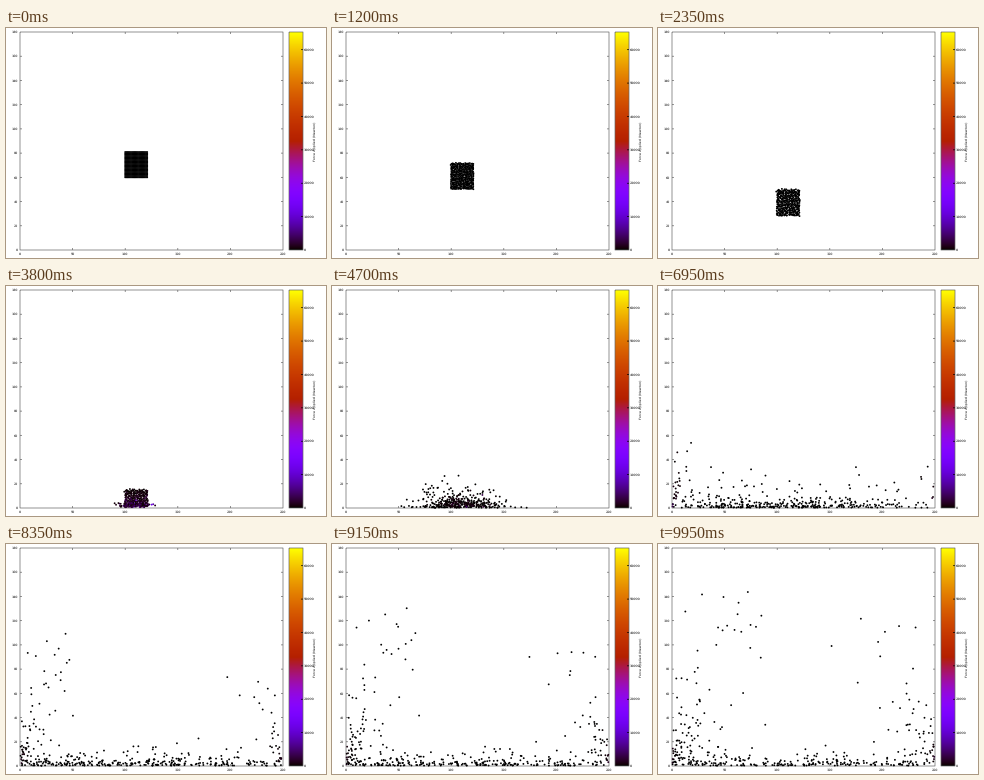
Animation of 320 by 230 pixels, one loop 10 s. Source, as a matplotlib script:

```python
import numpy as np
import matplotlib.pyplot as plt
from matplotlib.animation import FuncAnimation

W, H, DPI = 320, 230, 80
PX = 72 / DPI                       # points per pixel
FRAMES, INTERVAL, SUBSTEPS = 200, 50, 4
LEFT, RIGHT, TOP, BOTTOM = 14, 277, 4, 222
X_MAX, Y_MAX, FORCE_MAX = 250, 180, 65300
BAR_LEFT, BAR_RIGHT = 283, 297
GRAVITY, FALL_ACCEL, FALL_SPEED = 12.0, 14.0, 26.0

plt.rcParams["font.family"] = "DejaVu Sans"
plt.rcParams["text.hinting"] = "no_hinting"


def to_px(x, y):
    return (LEFT + x * (RIGHT - LEFT) / X_MAX,
            BOTTOM - y * (BOTTOM - TOP) / Y_MAX)


def palette(level):
    """Black, violet, red, orange, yellow ramp for levels in 0..1."""
    v = np.clip(level, 0, 1)
    blue = np.clip(np.sin(2 * np.pi * v), 0, 1)
    return np.stack([np.sqrt(v), v ** 3, blue], axis=-1)


def fall_distance(t):
    return (FALL_SPEED ** 2 / FALL_ACCEL
            * np.log(np.cosh(FALL_ACCEL * t / FALL_SPEED)))


def simulate():
    """Drop a block of grains; return positions and forces for every frame."""
    rng = np.random.default_rng(11)
    gx, gy = np.meshgrid(100 + 1.1 * np.arange(20), 60 + 1.1 * np.arange(20))
    x0, y0 = gx.ravel(), gy.ravel()
    n = x0.size
    jitter = np.clip(rng.normal(0, 0.45, (2, n)), -0.9, 0.9)
    floor = rng.uniform(0.2, 2.5, n)
    spread = rng.normal(-2, 25, n) + 0.6 * (x0 - 110.5)
    spread = np.clip(spread, -42, 50) * rng.uniform(0.88, 1, n)
    throw = np.minimum(3 + rng.exponential(5.5, n), 28)
    peak = rng.exponential(2600, n)

    times = np.linspace(0, 5, 2000)
    land = np.interp(y0 - floor, fall_distance(times), times)

    x, y = x0.copy(), y0.copy()
    vx, vy = np.zeros(n), np.zeros(n)
    wall_force = np.zeros(n)
    free = np.zeros(n, bool)
    dt = INTERVAL / 1000 / SUBSTEPS
    path = []
    for step in range(FRAMES * SUBSTEPS):
        t = step * dt
        if step % SUBSTEPS == 0:
            squeeze = peak * np.exp(-((t - land) / 0.32) ** 2)
            path.append((x.copy(), y.copy(), squeeze + wall_force))
        t += dt

        start = ~free & (t >= land)
        vx[start], vy[start] = spread[start], throw[start]
        free |= start

        loose = min(t / 2.2, 1)
        x = np.where(free, x + vx * dt, x0 + jitter[0] * loose)
        y = np.where(free, y + vy * dt,
                     y0 - fall_distance(t) + jitter[1] * loose)
        y = np.maximum(y, 0.2)
        vy[free] -= GRAVITY * dt

        ground = free & (y <= 0.3) & (vy < 0)
        hop = np.abs(rng.normal(0, 8, n))
        vy = np.where(ground, np.maximum(hop, -0.45 * vy), vy)

        # Grains that strike a side wall are pushed up along it.
        wall = free & (((x < 0.5) & (vx < 0)) | ((x > X_MAX - 0.5) & (vx > 0)))
        lift = np.minimum(1.6 * np.abs(vx) * rng.uniform(0.2, 1, n), 62)
        vy = np.where(wall, np.maximum(vy, lift), vy)
        wall_force = np.where(wall, 90 * np.abs(vx), wall_force * 0.9)
        vx = np.where(wall, -vx * rng.uniform(0.04, 0.65, n), vx)
        x = np.clip(x, 0.3, X_MAX - 0.3)
    return path


fig = plt.figure(figsize=(W / DPI, H / DPI), dpi=DPI, facecolor="white")
ax = fig.add_axes([0, 0, 1, 1])
ax.axis("off")


def line(xs, ys, color="0.4", width=0.7):
    ax.plot(xs, ys, color=color, lw=width * PX, zorder=3,
            solid_capstyle="butt", snap=False)


def box(left, right):
    line([left, right, right, left, left],
         [TOP, TOP, BOTTOM, BOTTOM, TOP])


def label(x, y, text, **kw):
    ax.text(x, y, text, fontsize=3.4 * PX, color="black", **kw)


def draw_plot_frame():
    box(LEFT, RIGHT)
    for value in range(0, X_MAX + 1, 50):
        x, _ = to_px(value, 0)
        if 0 < value < X_MAX:
            line([x, x], [BOTTOM, BOTTOM - 2])
            line([x, x], [TOP, TOP + 2])
        label(x, 226.2, str(value), ha="center", va="center_baseline")
    for value in range(0, Y_MAX + 1, 20):
        _, y = to_px(0, value)
        if 0 < value < Y_MAX:
            line([LEFT, LEFT + 2], [y, y])
            line([RIGHT, RIGHT - 2], [y, y])
        label(12.2, y, str(value), ha="right", va="center_baseline")


def draw_color_bar():
    ramp = palette(np.linspace(1, 0, 218))[:, None, :]
    ax.imshow(ramp, extent=(BAR_LEFT, BAR_RIGHT, BOTTOM, TOP),
              aspect="auto", interpolation="bilinear", zorder=1)
    box(BAR_LEFT, BAR_RIGHT)
    for value in range(0, 60001, 10000):
        y = BOTTOM - value / FORCE_MAX * (BOTTOM - TOP)
        if value:
            line([BAR_RIGHT - 2, BAR_RIGHT], [y, y], color="black")
        label(297.9, y, str(value), ha="left", va="center_baseline")
    label(308.8, 113, "Force Applied (Newton)", rotation=90,
          ha="center", va="center")


draw_plot_frame()
draw_color_bar()
ax.set_xlim(0, W)
ax.set_ylim(H, 0)

path = simulate()
grains = ax.scatter(*to_px(*path[0][:2]), s=(1.85 * PX) ** 2, c="black",
                    linewidths=0, zorder=4, clip_on=False)


def update(i):
    x, y, force = path[i]
    grains.set_offsets(np.column_stack(to_px(x, y)))
    grains.set_facecolor(palette(force / FORCE_MAX))
    return (grains,)


anim = FuncAnimation(fig, update, frames=FRAMES, interval=INTERVAL,
                     repeat=True, repeat_delay=0, blit=False)
plt.show()
```
